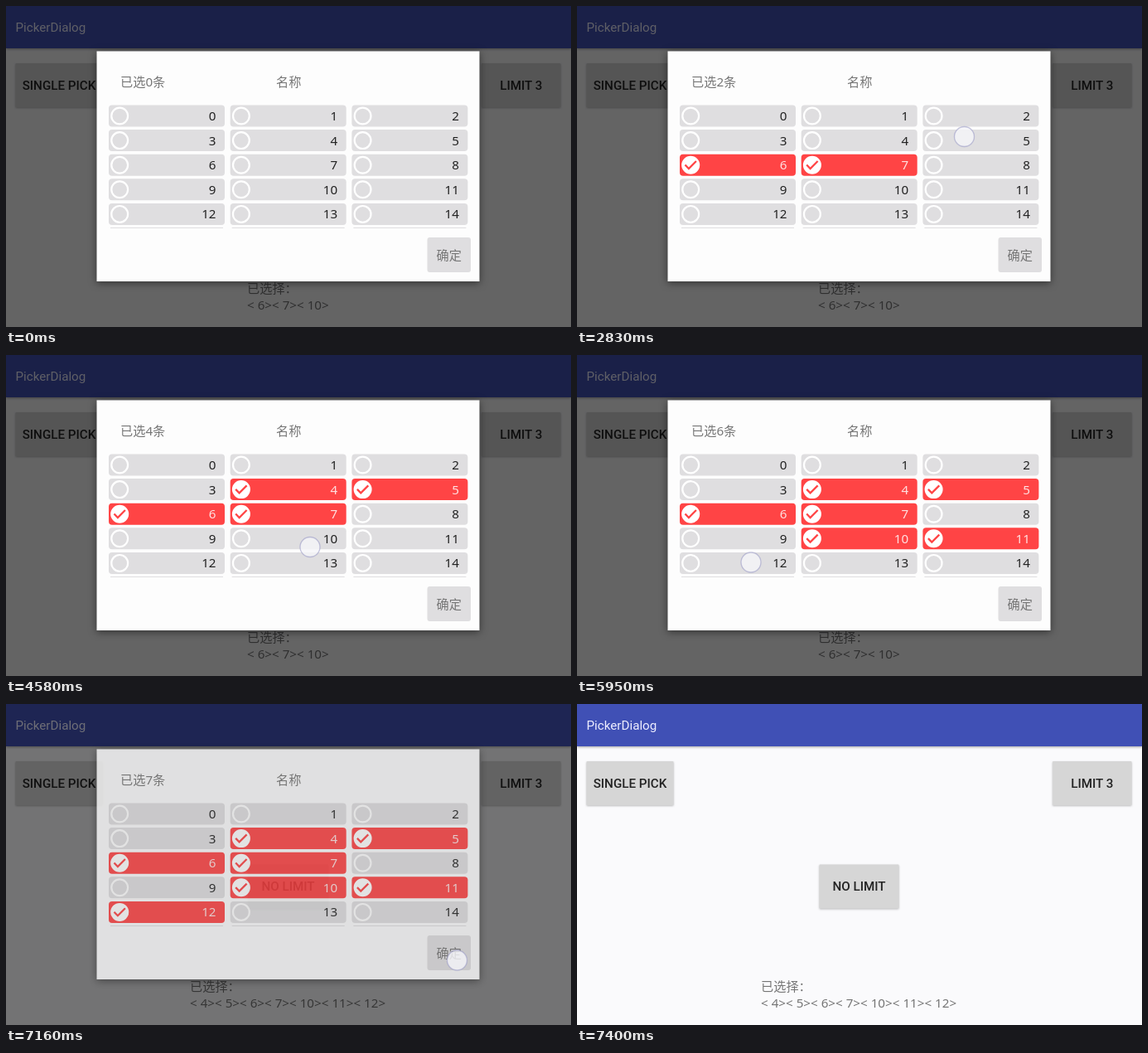
Write an HTML page that moves like this. It is 682 px wide and 387 px high and loops after 8 s.

```html
<!DOCTYPE html>
<html lang="zh">
<head>
<meta charset="utf-8">
<title>PickerDialog</title>
<style>
  html, body { margin: 0; width: 100%; height: 100%; overflow: hidden; background: #fafafc; }
  svg { display: block; width: 682px; height: 387px; }
  text { font: 15.2px "Noto Sans", "Noto Sans CJK SC", "Noto Sans CJK", sans-serif; fill: #757575; }
  .ui { font-family: Roboto, sans-serif; fill: #222; }
  .mid { text-anchor: middle; font-weight: 500; }
  .raised { fill: #d6d6d6; filter: drop-shadow(0 1px 1px rgba(0, 0, 0, .25)); }
  .panel { fill: #fdfdfd; filter: drop-shadow(0 2px 5px rgba(0, 0, 0, .5)); }
  .cell rect, .soft { fill: #dfdee0; }
  .cell text { fill: #222; text-anchor: end; }
  .cell circle { fill: none; stroke: #fff; stroke-width: 2.2; }
  .cell path { fill: none; stroke: #ff4445; stroke-width: 2.3; visibility: hidden; }
  .cell.on rect { fill: #ff4445; }
  .cell.on text { fill: #ffe0e0; }
  .cell.on circle { fill: #fff; }
  .cell.on path { visibility: visible; }
  #touch { fill: rgba(245, 245, 249, .8); stroke: rgba(150, 150, 195, .55); stroke-width: 1.3; }
</style>
</head>
<body>
<svg viewBox="0 0 682 387">
  <rect width="682" height="387" fill="#fafafc"/>
  <rect width="682" height="51" fill="#4050b5" style="filter:drop-shadow(0 1.5px 1.5px rgba(0,0,0,.35))"/>
  <text class="ui" x="11.5" y="31" style="fill:#eef">PickerDialog</text>
  <g id="buttons"></g>
  <text id="caption" y="345.5">已选择：</text>
  <text id="result" y="366"></text>
  <rect id="scrim" width="682" height="387"/>
  <g id="dialog">
    <rect class="panel" x="109.5" y="54.5" width="462" height="277.5"/>
    <text id="count" x="138" y="97"></text>
    <text x="326" y="97">名称</text>
    <g id="grid"></g>
    <rect class="soft" x="508.5" y="279" width="52.5" height="42" rx="3"/>
    <text x="519.5" y="305.5">确定</text>
  </g>
  <circle id="touch" r="12"/>
</svg>
<script>
const $ = id => document.getElementById(id);
const LOOP = 8000;

// Each tap: finger down, effect, finger up, position, toggled cell
const taps = [
  [860, 970, 1070, 340, 191, 7],
  [1600, 1880, 2060, 223, 197, 6],
  [2830, 2900, 2990, 467.5, 157.5, 5],
  [3710, 3830, 3930, 340, 161, 4],
  [4580, 4750, 4860, 367, 231.5, 10],
  [5040, 5170, 5270, 470, 220, 11],
  [5950, 6040, 6120, 210, 250, 12],
  [7050, 7100, 7310, 544.5, 309]
];

const button = (x, y, w, h, label) => `
  <rect class="raised" x="${x}" y="${y}" width="${w}" height="${h}" rx="1"/>
  <text class="ui mid" x="${x + w / 2}" y="${y + h / 2 + 5}">${label}</text>`;
$('buttons').innerHTML = button(11.5, 69, 105, 53, 'SINGLE PICK')
  + button(574, 69, 95.5, 53, 'LIMIT 3')
  + button(292.5, 193.5, 96, 53, 'NO LIMIT');

const columnX = i => 124 + 146.7 * (i % 3);
let cells = '';
for (let i = 0; i < 15; i++) {
  cells += `<g class="cell" transform="translate(${columnX(i)} ${119.5 + 29.6 * Math.floor(i / 3)})">
    <rect width="140" height="26" rx="4"/>
    <circle cx="13.2" cy="13" r="9.9"/>
    <path d="M6.5 12.8l4.4 4.5 9-9"/>
    <text x="129.5" y="18.6">${i}</text></g>`;
}
for (let i = 0; i < 3; i++)
  cells += `<rect class="soft" x="${columnX(i) + 2}" y="267" width="136" height="1"/>`;
$('grid').innerHTML = cells;
const cellNodes = document.querySelectorAll('.cell');

const fade = (t, start, end) => Math.min(1, Math.max(0, (end - t) / (end - start)));

function render(t) {
  const picked = taps.filter(p => p[5] !== undefined && t >= p[1]).map(p => p[5]);
  cellNodes.forEach((node, i) => node.classList.toggle('on', picked.includes(i)));
  $('count').textContent = `已选${picked.length}条`;

  const confirmed = t >= 7100;
  const shown = confirmed ? picked.sort((a, b) => a - b) : [6, 7, 10];
  $('result').textContent = shown.map(n => `< ${n}>`).join('');
  for (const id of ['caption', 'result']) $(id).setAttribute('x', confirmed ? 222 : 291);

  $('scrim').setAttribute('opacity', 0.6 * fade(t, 7135, 7380));
  $('dialog').setAttribute('opacity', fade(t, 7140, 7243));

  const tap = taps.find(p => t >= p[0] && t < p[2]);
  $('touch').setAttribute('visibility', tap ? 'visible' : 'hidden');
  if (tap) $('touch').setAttribute('transform', `translate(${tap[3]} ${tap[4]})`);
}

const origin = performance.now();
function tick() {
  render((performance.now() - origin) % LOOP);
  requestAnimationFrame(tick);
}
tick();
</script>
</body>
</html>
```
